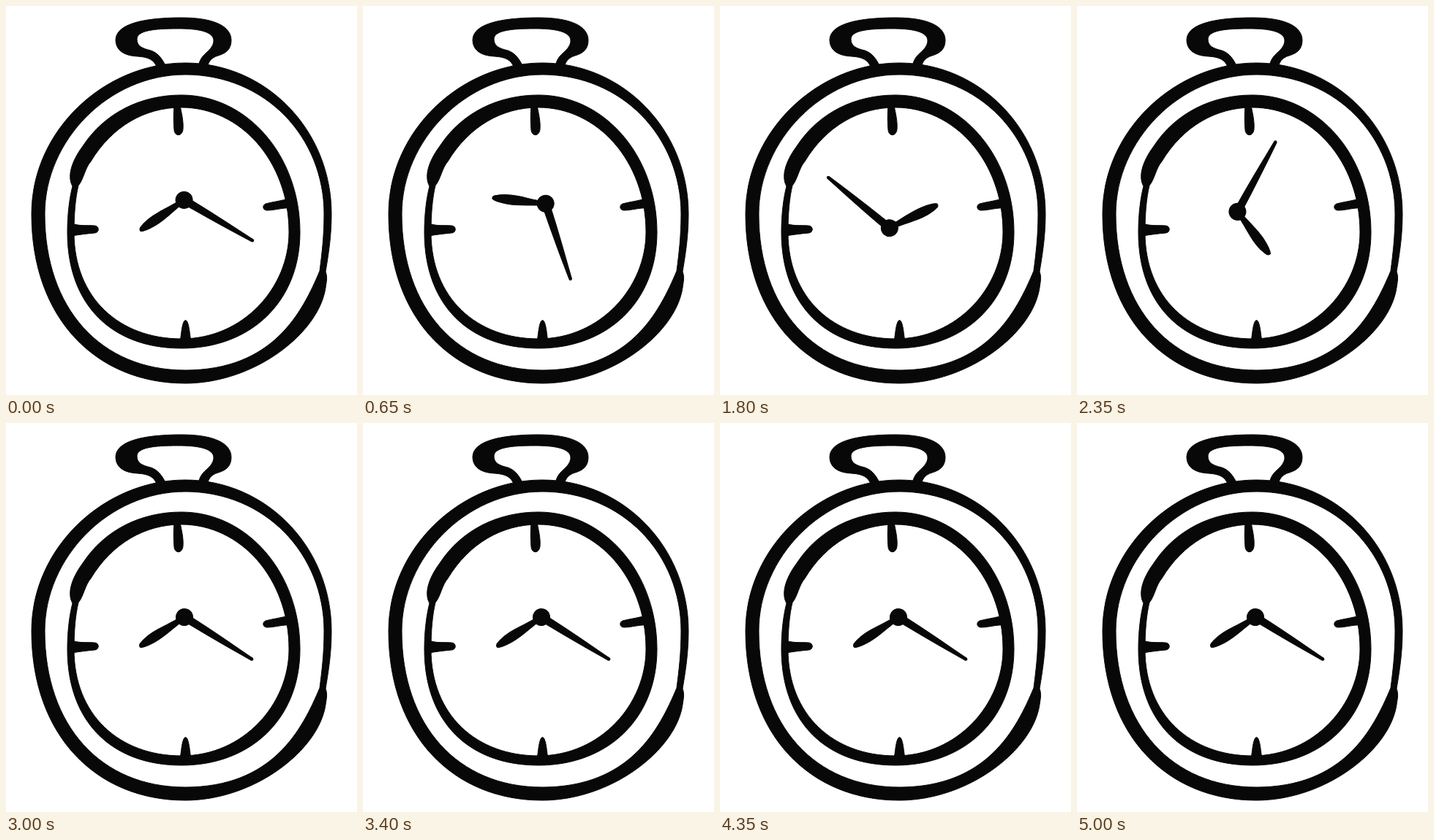
These frames come from a looping animation (480 px wide and 533 px high, 5050 ms). An HTML page:

```html
<!DOCTYPE html>
<html lang="en">
<head>
<meta charset="utf-8">
<title>Pocket watch</title>
<style>
html, body { margin: 0; width: 100%; height: 100%; overflow: hidden; background: #fff; }
svg { display: block; width: 100%; height: 100%; fill: #080808; stroke: #080808; fill-rule: evenodd; }
</style>
</head>
<body>
<svg viewBox="0 0 480 533">
  <!-- case -->
  <path d="M245 78 C356 78 445 170 445 285 C445 315 441 340 437 364 C440 372 438 378 437 386
           C428 448 340 517 245 517 C125 517 35 430 35 285 C35 170 135 78 245 78Z
           M245 94 C355 94 435 180 435 285 C435 315 432 340 429 363 C405 420 365 499 245 499
           C130 499 53 415 53 285 C53 185 140 94 245 94Z"/>
  <!-- dial -->
  <path d="M240 122 C330 122 402 205 402 310 C402 405 335 469 240 469 C145 469 84 410 84 310
           C84 285 87 262 91 247 C84 235 88 215 105 192 C135 146 185 122 240 122Z
           M240 139 C320 139 387 212 387 310 C387 385 325 456 240 456 C155 456 93 400 93 310
           C93 285 95 262 99 246 C106 238 108 222 116 213 C145 165 190 139 240 139Z"/>
  <!-- bow -->
  <path d="M206 84 C203 74 195 70 180 69 C160 68 150 60 150 46 C151 24 190 16 240 16
           C285 16 308 28 308 47 C308 60 300 65 290 68 C280 71 277 77 275 84 L263 84
           C264 76 267 70 274 64 C282 57 286 50 283 43 C278 34 260 31 235 31
           C200 31 180 34 179 45 C179 55 186 58 198 61 C208 64 215 74 219 84Z"/>
  <!-- ticks -->
  <path d="M230 136 L238 136 C240 147 243 158 242 169 C241 179 231 179 230 170 C229 159 229 147 230 136Z"/>
  <path d="M389 263 L389 277 C378 276 368 280 357 280 C351 280 350 273 355 271 C366 268 378 267 389 263Z"/>
  <path d="M90 298 C101 302 111 300 121 301 C128 301 128 311 121 311 C111 312 101 313 90 315Z"/>
  <path d="M238 460 C240 449 240 440 243 433 Q245.500 428 248 433 C251 440 251 449 253 460Z"/>
  <g id="hands">
    <g transform="translate(244 266) rotate(32)">
      <circle r="11.500"/>
      <path d="M5 -5 C40 -5 75 -3 109 -1.800 Q112 0 109 1.700 C75 3.500 45 4.500 5 5Z"/>
      <path transform="rotate(114.600)" d="M5 -3 C22 -4 36 -7.500 52 -6.300 C62 -5.500 70 -4 73 -1.500 Q74 1 71 3 C60 7 48 7 38 6 C26 5 16 3 5 3Z"/>
    </g>
  </g>
</svg>
<script>
const LOOP = 5050, STEP = 50;   // ms
const RAMP = 1300, STOP = 3000; // end of speeding up, end of turning
const SPEED = 0.1437;           // degrees per ms once up to speed
const LAG = 4.13e-5;            // curvature of the run-up
const CENTER = '239.2 285.5';
const hands = document.getElementById('hands');

// Speeds up evenly, holds its speed, stops dead after one turn.
function angleAt(t) {
  return 360 - SPEED * Math.max(0, STOP - t) + LAG * Math.max(0, RAMP - t) ** 2;
}

function render(t) {
  // The axis sways aside while the hands gather speed.
  const sway = Math.sin(Math.PI * Math.min(t / RAMP, 1)) ** 2;
  hands.setAttribute('transform',
    `translate(${-5.7 * sway} ${-2.8 * sway}) rotate(${angleAt(t)} ${CENTER})`);
}

const start = performance.now();
function tick() {
  const t = (performance.now() - start) % LOOP;
  render(Math.floor(t / STEP) * STEP);
  requestAnimationFrame(tick);
}
tick();
</script>
</body>
</html>
```
